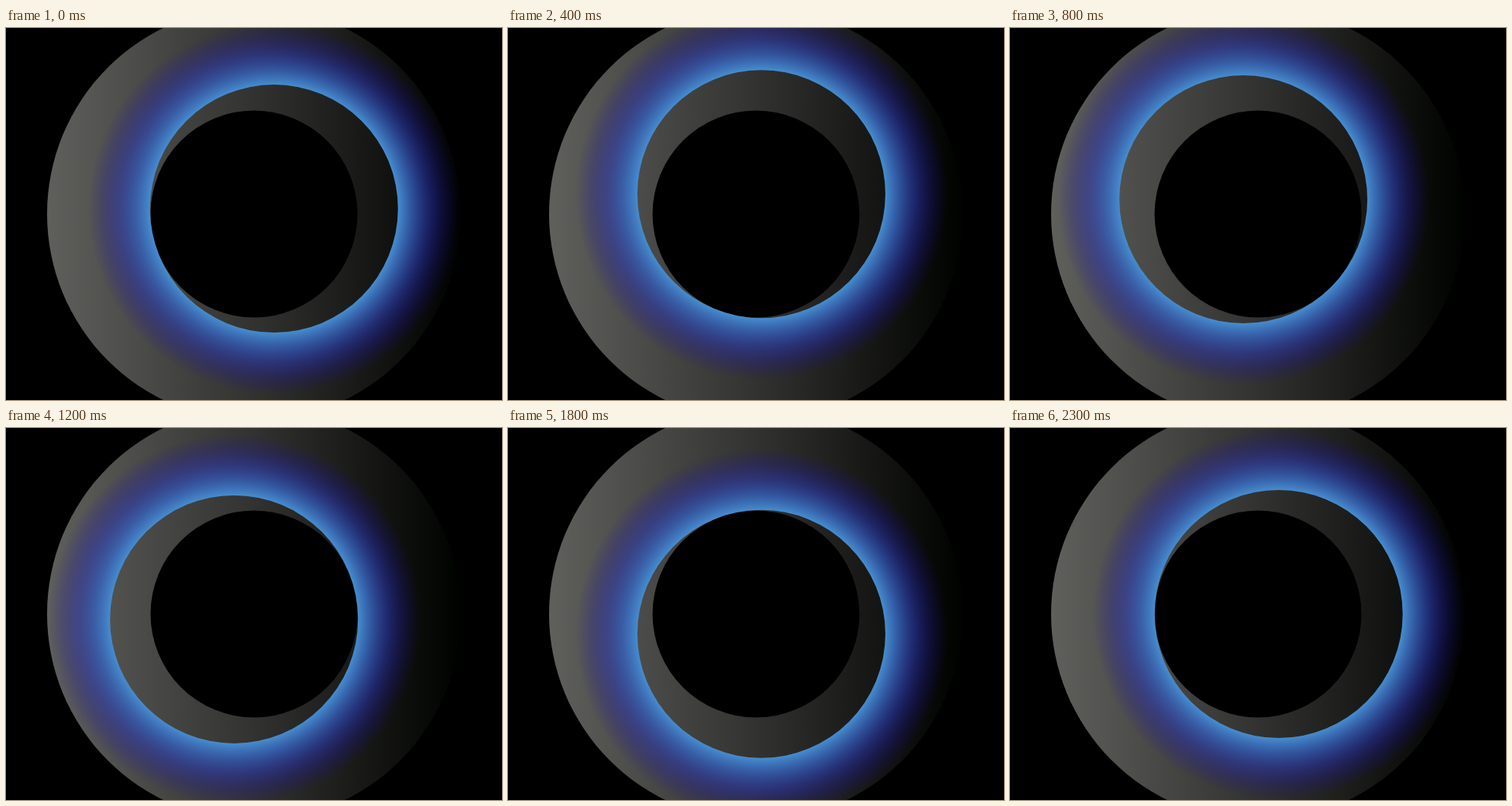
Animation of 640x480 px, one loop 2.4 s. Source, as an HTML page with a canvas:

```html
<!DOCTYPE html>
<html lang="en">
<head>
<meta charset="utf-8">
<title>Orbiting blue ring</title>
<style>
html, body { margin: 0; width: 100%; height: 100%; overflow: hidden; background: #000; }
canvas { display: block; }
</style>
</head>
<body>
<canvas id="stage" width="640" height="480"></canvas>
<script>
const ctx = document.getElementById('stage').getContext('2d');
const CX = 320, CY = 240, DISC = 267, HOLE = 133.5;
const ORBIT = 26.7, INNER = 160, OUTER = 240;
const STEP_MS = 100, STEPS = 24;

function withStops(gradient, colors) {
  colors.forEach((color, i) => gradient.addColorStop(i / (colors.length - 1), color));
  return gradient;
}

const gray = withStops(ctx.createLinearGradient(CX - DISC, 0, CX + DISC, 0),
  ['rgb(95,96,92)', 'rgb(50,50,48)', 'rgb(0,2,0)']);

// Centred on the origin; the context is translated to the ring.
const glow = withStops(ctx.createRadialGradient(0, 0, INNER, 0, 0, OUTER), [
  'rgba(70,140,206,1)',
  'rgba(52,96,188,.79)',
  'rgba(42,55,180,.53)',
  'rgba(32,25,165,.27)',
  'rgba(25,10,150,0)'
]);

function disc(x, y, r, fill) {
  ctx.beginPath();
  ctx.arc(x, y, r, 0, 2 * Math.PI);
  ctx.fillStyle = fill;
  ctx.fill();
}

function ring(x, y) {
  ctx.save();
  ctx.translate(x, y);
  ctx.beginPath();
  ctx.arc(0, 0, OUTER, 0, 2 * Math.PI);
  ctx.arc(0, 0, INNER, 0, 2 * Math.PI, true);
  ctx.fillStyle = glow;
  ctx.fill();
  ctx.restore();
}

function draw() {
  const step = Math.floor(performance.now() / STEP_MS) % STEPS;
  const angle = -(step + 1) / STEPS * 2 * Math.PI;
  ctx.fillStyle = '#000';
  ctx.fillRect(0, 0, 640, 480);
  disc(CX, CY, DISC, gray);
  disc(CX, CY, HOLE, '#000');
  ring(CX + ORBIT * Math.cos(angle), CY + ORBIT * Math.sin(angle));
  requestAnimationFrame(draw);
}
draw();
</script>
</body>
</html>
```
